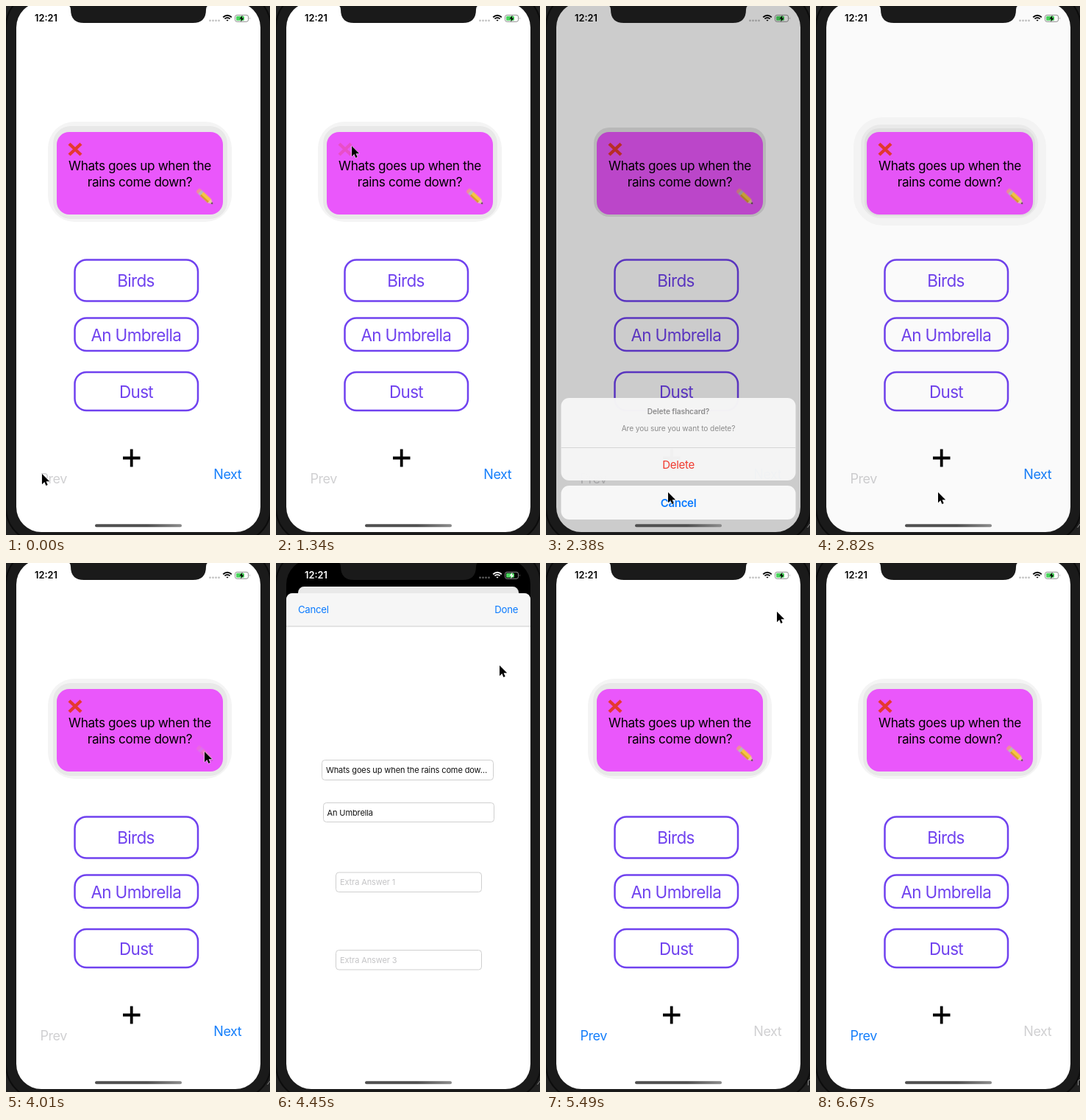
An HTML page for the animation above (7.42 s loop, 359 by 718 pixels).

```html
<!DOCTYPE html>
<html lang="en">
<head>
<meta charset="utf-8">
<title>Flashcards</title>
<style>
  html, body { margin: 0; width: 100%; height: 100%; overflow: hidden; background: #1a1a1a; }
  svg { display: block; width: 100%; height: 100%; font-family: Inter, Roboto, sans-serif; }
  .mid { text-anchor: middle; }
  .card { font-size: 17.2px; letter-spacing: -.02em; }
  .answer { font-size: 22.5px; letter-spacing: -.03em; fill: #7042ef; }
  .outline { fill: none; stroke: #7042ef; stroke-width: 2.5; }
  .nav { font-size: 18px; letter-spacing: -.025em; }
  .bar { font-size: 13.2px; letter-spacing: -.02em; fill: #0a7aff; }
  .field { fill: #fff; stroke: #cfcfcf; }
  .input { font-size: 11px; letter-spacing: -.01em; fill: #111; }
  .hint { fill: #c4c4c6; }
  .note { font-size: 10.2px; letter-spacing: -.01em; fill: #8c8c8c; }
  .action { font-size: 15px; letter-spacing: -.02em; }
  .bold { font-weight: 600; }
  #app { transform-origin: 180px -5px; }
</style>
</head>
<body>
<svg viewBox="0 0 359 718">
  <defs>
    <clipPath id="screen"><rect x="14" y="-5" width="332" height="719" rx="34"/></clipPath>
    <linearGradient id="homeFill"><stop offset=".6" stop-color="#505050"/><stop offset="1" stop-color="#8c8c8c"/></linearGradient>
  </defs>

  <rect width="359" height="718" fill="#222"/>
  <rect x="0" y="-19" width="360" height="747" rx="47" fill="#1a1a1a" stroke="#0c0c0c" stroke-width="2"/>

  <g clip-path="url(#screen)">
    <rect width="359" height="718"/>

    <g id="app">
      <rect x="14" y="-5" width="332" height="719" rx="9" fill="#fff"/>
      <g id="glow">
        <rect x="57" y="157" width="250" height="136" rx="36" fill="#f4f4f4"/>
        <rect x="64" y="163" width="237" height="126" rx="24" fill="#e8e8e8"/>
      </g>
      <rect id="glowDim" x="65" y="165" width="234" height="121" rx="21" fill="#e6e6e6"/>
      <g id="glowFade">
        <rect x="51" y="151" width="262" height="147" rx="40" fill="#f8f8f8"/>
        <rect x="61" y="161" width="241" height="127" rx="27" fill="#eee"/>
        <rect x="66" y="166" width="232" height="119" rx="20" fill="#e2e2e2"/>
      </g>
      <rect x="69" y="171" width="226" height="112" rx="17" fill="#ea57fb"/>
      <path id="cross" d="M86 187l16 15m0-15l-16 15" stroke="#e5392f" stroke-width="4.4"/>
      <text class="card mid" x="182" y="223">Whats goes up when the</text>
      <text class="card mid" x="182" y="244.7">rains come down?</text>
      <g id="pencil"><g transform="translate(260.5 249.5) rotate(43)">
        <rect x="0" y="-3.4" width="6" height="6.8" rx="2" fill="#ee8f9b"/>
        <rect x="4" y="-3.4" width="4" height="6.8" fill="#b9b9b9"/>
        <rect x="8" y="-3.4" width="14" height="6.8" fill="#f6c544"/>
        <path d="M8 1.2h14v2.2h-14z" fill="#d39a2c"/>
        <path d="M22-3.4L28.5 0 22 3.4z" fill="#e9c9a0"/>
        <path d="M25.8-1.4L28.5 0l-2.7 1.4z" fill="#333"/>
      </g></g>

      <rect class="outline" x="93.5" y="344.5" width="167.5" height="56" rx="16"/>
      <rect class="outline" x="93.5" y="423.5" width="167.5" height="44.5" rx="16"/>
      <rect class="outline" x="93.5" y="497" width="167.5" height="52" rx="16"/>
      <text class="answer mid" x="176.5" y="381">Birds</text>
      <text class="answer mid" x="176.8" y="454.7">An Umbrella</text>
      <text class="answer mid" x="177" y="531.7">Dust</text>

      <path d="M159 613.5h23.5M170.7 601.5v24" stroke="#000" stroke-width="3.8"/>
      <text id="prev" class="nav" x="46.5" y="648">Prev</text>
      <text id="next" class="nav" x="282.3" y="642">Next</text>
      <rect id="back" x="14" y="-5" width="332" height="719" rx="9" opacity="0"/>
    </g>

    <g id="modal">
      <rect x="14" y="41" width="332" height="760" rx="9" fill="#fff"/>
      <path d="M14 86V50q0-9 9-9h314q9 0 9 9v36z" fill="#f6f6f6"/>
      <path d="M14 86h332" stroke="#cdcdcd"/>
      <text class="bar" x="30" y="68.3">Cancel</text>
      <text class="bar" x="297.3" y="68.3">Done</text>
      <rect class="field" x="62.5" y="267.5" width="233" height="27" rx="4"/>
      <rect class="field" x="64.5" y="325.5" width="232" height="26" rx="4"/>
      <rect class="field" x="81.5" y="420" width="198" height="26.5" rx="4"/>
      <rect class="field" x="81.5" y="525.5" width="198" height="26.5" rx="4"/>
      <text class="input" x="68" y="285">Whats goes up when the rains come dow…</text>
      <text class="input" x="69.5" y="342.5">An Umbrella</text>
      <text class="input hint" x="87" y="437">Extra Answer 1</text>
      <text class="input hint" x="87" y="542.5">Extra Answer 3</text>
    </g>

    <g id="status">
      <text class="bold" x="39" y="21.3" font-size="12.8" fill="currentColor">12:21</text>
      <g fill="#999" opacity=".6">
        <circle cx="277.5" cy="19.8" r="1.4"/><circle cx="281.5" cy="19.8" r="1.4"/>
        <circle cx="285.5" cy="19.8" r="1.4"/><circle cx="289.5" cy="19.8" r="1.4"/>
      </g>
      <g fill="none" stroke="currentColor" stroke-width="1.8">
        <path d="M295.2 15.2q5.8-5 11.6 0M297.4 17.4q3.6-3 7.2 0"/>
        <path d="M299.3 18.8h3.4L301 20.8z" fill="currentColor" stroke="none"/>
      </g>
      <rect x="311.5" y="12.3" width="18" height="9" rx="2.6" fill="none" stroke="#8e8e8e"/>
      <path d="M331 15.3q1.6 1.5 0 3z" fill="#8e8e8e"/>
      <rect x="313" y="13.8" width="11" height="6" rx="1.2" fill="#4cd45f"/>
      <path d="M321.5 12.5l-4 5h2.6l-.8 4 4-5h-2.6z" fill="currentColor"/>
    </g>

    <rect id="dim" width="359" height="718" opacity="0"/>
    <g id="sheet">
      <rect x="20.5" y="532" width="319" height="112" rx="11" fill="#f5f5f5" fill-opacity=".98"/>
      <path d="M20.5 599.5h319" stroke="#d6d6d6"/>
      <text class="note bold mid" x="180" y="554">Delete flashcard?</text>
      <text class="note mid" x="180" y="576.7">Are you sure you want to delete?</text>
      <text class="action mid" x="180" y="627.5" fill="#f03a2f">Delete</text>
      <rect x="20.5" y="651" width="319" height="46" rx="11" fill="#f7f7f7"/>
      <text class="action bold mid" x="180" y="679.5" fill="#0a7aff">Cancel</text>
    </g>
    <rect x="121" y="703.3" width="118" height="4" rx="2" fill="url(#homeFill)"/>
  </g>

  <path d="M83 -1q5 0 5 6 0 18 18 18h148q18 0 18-18 0-6 5-6z" fill="#1a1a1a"/>
  <path id="slash" d="M355.5 708l3.5-5" stroke="#8a8a8a"/>
  <path id="stem" d="M356.5 709v-6q0-1.500 2.500-1.500" fill="none" stroke="#8a8a8a"/>
  <path id="cursor" d="M0 0v14.200l3.300-3.100 2.100 5 2.300-1-2.100-4.900h4.600z" stroke="#fff" stroke-width="1" paint-order="stroke"/>
</svg>

<script>
const LOOP = 7420, STEPS = 45;
const SHORT = [6, 12, 17, 21, 28, 34, 39, 42];

// Steps last 150 ms, a few of them 140 ms.
const start = [0];
for (let i = 0; i < STEPS; i++) start.push(start[i] + (SHORT.includes(i) ? 140 : 150));

// rows: [step, css], each held until the next row
function track(id, rows) {
  const frames = rows.map(([step, css]) => ({ ...css, offset: start[step] / LOOP, easing: 'step-end' }));
  frames.push({ ...rows[rows.length - 1][1], offset: 1 });
  document.getElementById(id).animate(frames, { duration: LOOP, iterations: Infinity });
}

const opacity = rows => rows.map(([step, v]) => [step, { opacity: v }]);
const shift = (x, y) => ({ transform: `translate(${x}px, ${y}px)` });

// Pressed icons
track('cross', opacity([[0, 1], [9, .25], [10, 1]]));
track('pencil', opacity([[0, 1], [27, .25], [28, 1]]));

// Action sheet
const sheet = [[0, 0], [10, .5], [11, 1], [18, .4], [19, 0]];
track('sheet', sheet.map(([step, p]) => [step, shift(0, (1 - p) * 190)]));
track('dim', opacity([[0, 0], [10, .1], [11, .2], [18, .1], [19, .02], [20, 0]]));
track('glow', opacity([[0, 1], [11, 0], [20, 1]]));
track('glowDim', opacity([[0, 0], [11, 1], [19, 0]]));
track('glowFade', opacity([[0, 0], [19, 1], [20, 0]]));

// Edit page slides over the shrinking app
const page = [[0, 0], [28, .55], [29, .95], [30, 1], [35, .65], [36, .08], [37, 0]];
track('modal', page.map(([step, p]) => [step, shift(0, (1 - p) * 680)]));
track('app', page.map(([step, p]) => [step, { transform: `translateY(${37 * p}px) scale(${1 - .096 * p})` }]));
track('back', page.map(([step, p]) => [step, { opacity: .09 * p }]));
track('status', page.map(([step, p]) => [step, { color: p > .5 ? '#fff' : '#000' }]));

const ON = { fill: '#147efb' }, OFF = { fill: '#d0d0d2' };
track('prev', [[0, OFF], [35, ON]]);
track('next', [[0, ON], [35, OFF]]);
track('slash', opacity([[0, 0], [11, 1], [37, 0]]));
track('stem', opacity([[0, 0], [37, 1]]));

// Pointer moves: first step, last step, from, bend, to
const moves = [
  [0, 7, [49, 635], [-25, 430], [103, 190]],
  [10, 16, [102.500, 190], [110, 420], [166, 660]],
  [19, 25, [166, 660], [200, 430], [270, 256]],
  [27, 33, [270, 256], [316, 117], [314, 66]],
  [37, 42, [314, 66], [312, 400], [294, 674]],
  [42, 45, [294, 674], [286, 694], [266, 724]]
];
const ease = u => u < .5 ? 4 * u ** 3 : 1 - 4 * (1 - u) ** 3;
const path = [];
for (const [a, b, from, bend, to] of moves) {
  for (let s = a; s <= b; s++) {
    if (path.length && path[path.length - 1][0] === s) continue;
    const u = a === 42 ? (s - a) / (b - a) : ease((s - a) / (b - a)), v = 1 - u;
    const at = i => v * v * from[i] + 2 * u * v * bend[i] + u * u * to[i];
    path.push([s, shift(at(0), at(1))]);
  }
}
track('cursor', path);
</script>
</body>
</html>
```
